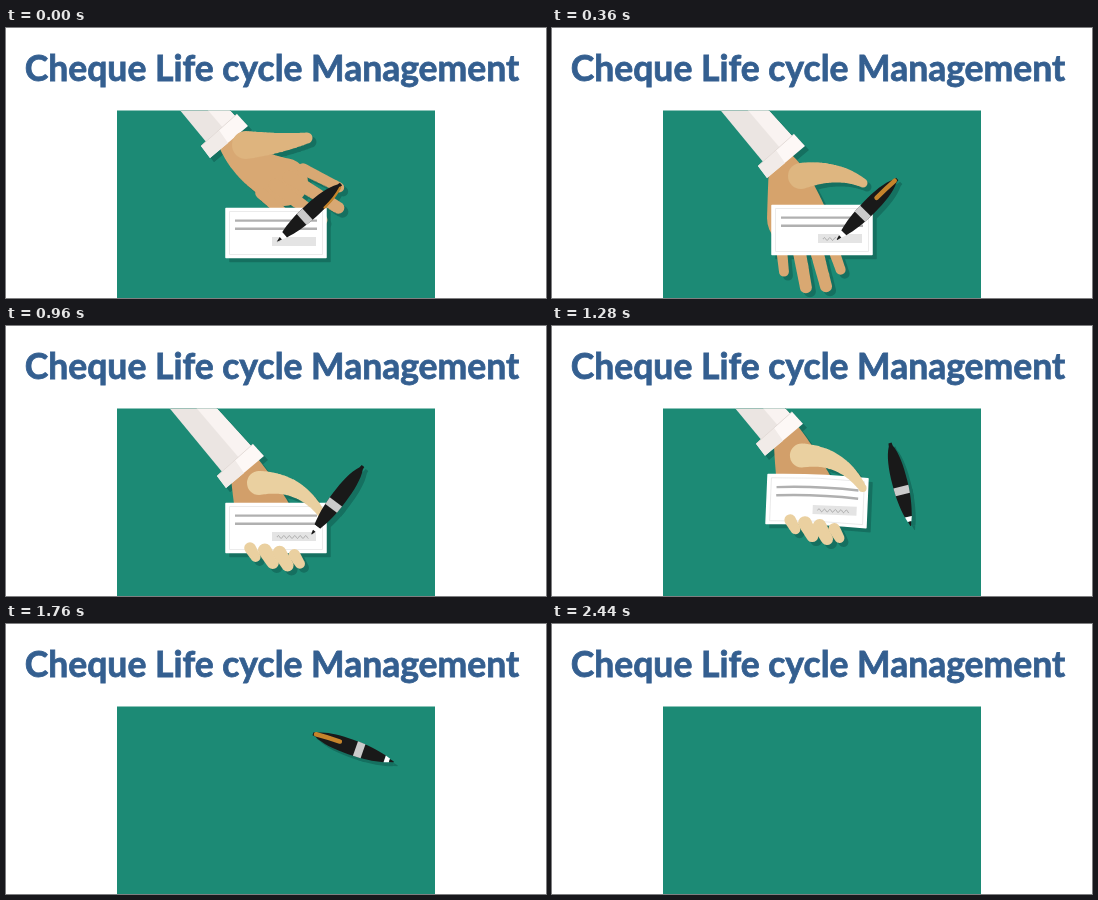
Write an HTML page with a canvas that moves like this. It is 540x270 px and loops after 2.48 s.

```html
<!DOCTYPE html>
<html lang="en">
<head>
<meta charset="utf-8">
<title>Cheque Life cycle Management</title>
<style>
  html, body { margin: 0; width: 100%; height: 100%; overflow: hidden; background: #fff; }
  svg, canvas { position: absolute; left: 0; top: 0; display: block; }
  canvas { left: 111px; top: 82px; }
  text {
    font: 700 35.5px Lato, sans-serif; text-anchor: middle;
    fill: #345f90; stroke: #345f90; stroke-width: 0.8px;
  }
</style>
</head>
<body>
<svg width="540" height="82"><text x="266" y="53">Cheque Life cycle Management</text></svg>
<canvas id="picture" width="318" height="188"></canvas>
<script>
const ctx = document.getElementById('picture').getContext('2d');
const LOOP = 2480, STEP = 40;
const GREEN = '#1c8a75', SHADE = '#157060';
let shadow = false;

// Hand poses: open, under the cheque, gripping.
// Limbs are start, bend and end points, then both radii.
const POSES = [
  { cuff: [-16, -32], palm: [227, 118, 245, 142, 278, 154, 13, 24], thumb: [240, 117, 274, 116, 301, 110, 14, 5.5],
    root: [255, 165], gap: [14, -8], aim: [42, -5, 58],
    skin: [216, 168, 115], thumbSkin: [222, 180, 126], tipSkin: [216, 168, 115] },
  { cuff: [-5, -12], palm: [231, 138, 238, 155, 245, 190, 14, 30], thumb: [249, 148, 285, 140, 311, 155, 13, 4.5],
    root: [228, 206], gap: [16, 0], aim: [84, -4.5, 54],
    skin: [214, 163, 108], thumbSkin: [222, 182, 128], tipSkin: [217, 168, 114] },
  { cuff: [0, 0], palm: [238, 138, 246, 158, 258, 190, 14, 28], thumb: [253, 157, 292, 154, 315, 187, 12, 4],
    root: [244, 222], gap: [14.8, 2.3], aim: [58, 0, 15],
    skin: [210, 159, 106], thumbSkin: [234, 208, 160], tipSkin: [234, 208, 160] }];

// time, cap x, cap y, angle
const PEN = [[0, 335, 156, 138], [960, 357, 140, 127], [1280, 338, 117, 76],
  [1600, 331, 113, 19], [2000, 240, 101, 21], [2240, 161, 63, 78], [2440, 156, -12, 88]];

const clamp = u => Math.max(0, Math.min(1, u));
const smooth = u => clamp(u) ** 2 * (3 - 2 * clamp(u));
const mix = (a, b, f) => a.map((v, i) => v + (b[i] - v) * f);

// monotone curve through key points
function along(keys, t) {
  let i = 0;
  while (i < keys.length - 2 && t >= keys[i + 1][0]) i++;
  const [a, b] = [keys[i], keys[i + 1]], span = b[0] - a[0];
  const u = clamp((t - a[0]) / span), w = 1 - u;
  const slope = (j, c) => (keys[j + 1][c] - keys[j][c]) / (keys[j + 1][0] - keys[j][0]);
  const tangent = (j, c) => {
    const p = slope(Math.max(j - 1, 0), c), q = slope(Math.min(j, keys.length - 2), c);
    return p * q <= 0 ? 0 : 2 * p * q / (p + q);
  };
  return [1, 2, 3].map(c => a[c] * (1 + 2 * u) * w * w + b[c] * u * u * (3 - 2 * u)
    + span * u * w * (w * tangent(i, c) - u * tangent(i + 1, c)));
}

function handAt(k) {
  const i = k < 1 ? 0 : 1, hand = {};
  for (const part in POSES[i]) hand[part] = mix(POSES[i][part], POSES[i + 1][part], k - i);
  return hand;
}

const rgb = c => `rgb(${c.map(Math.round)})`;
const ink = color => shadow ? SHADE : color;

function fill(color) {
  ctx.fillStyle = ink(color);
  ctx.fill();
}

function poly(color, ...pts) {
  ctx.beginPath();
  pts.forEach(p => ctx.lineTo(...p));
  ctx.closePath();
  fill(color);
}

function stroke(color, width, cap = 'butt') {
  ctx.strokeStyle = ink(color);
  ctx.lineWidth = width;
  ctx.lineCap = cap;
  ctx.stroke();
}

// tapered round shape along a quadratic curve
function limb(color, [x0, y0, cx, cy, x1, y1, r0, r1]) {
  ctx.beginPath();
  for (let i = 0; i <= 50; i++) {
    const u = i / 50, a = (1 - u) ** 2, b = 2 * u * (1 - u), c = u * u;
    const x = a * x0 + b * cx + c * x1, y = a * y0 + b * cy + c * y1, r = r0 + (r1 - r0) * u;
    ctx.moveTo(x + r, y);
    ctx.arc(x, y, r, 0, 2 * Math.PI);
  }
  fill(color);
}

function placed(x, y, deg, draw) {
  ctx.save();
  ctx.translate(x, y);
  ctx.rotate(deg * Math.PI / 180);
  draw();
  ctx.restore();
}

// pinky first; the two middle fingers are longer and thicker
function drawFingers({ root, gap, aim: [angle, spread, length], tipSkin }) {
  for (let i = 0; i < 4; i++) {
    const bulge = Math.sin(Math.PI * i / 3), a = (angle + spread * i) * Math.PI / 180;
    const len = length * (0.7 + 0.35 * bulge), r = 5 + 1.2 * bulge;
    const x = root[0] + gap[0] * i, y = root[1] + gap[1] * i;
    const dx = len * Math.cos(a), dy = len * Math.sin(a);
    limb(rgb(tipSkin), [x, y, x + dx / 2, y + dy / 2, x + dx, y + dy, r + 0.8, r]);
  }
}

function drawSleeve() {
  poly('#ebe5e2', [104, 10], [145, 10], [246, 121], [217, 147]);
  poly('#f9f3f1', [129, 10], [145, 10], [246, 121], [234, 133]);
  poly('#fdf8f6', [211, 150], [247, 118], [258, 130], [220, 162]);
  poly('#f1ebe8', [211, 150], [229, 134], [238, 147], [220, 162]);
  ctx.beginPath();
  ctx.moveTo(211, 150);
  ctx.lineTo(247, 118);
  stroke('#ddd5d1', 0.8);
}

function drawCheque(written, bend) {
  const bow = (x0, x1, y) => ctx.quadraticCurveTo((x0 + x1) / 2, y - bend, x1, y);
  const sheet = (w, h) => {
    ctx.beginPath();
    ctx.moveTo(-w, -h);
    bow(-w, w, -h);
    ctx.lineTo(w, h);
    bow(w, -w, h);
    ctx.closePath();
  };
  sheet(50, 24.5);
  ctx.lineJoin = 'round';
  fill('#fff');
  stroke('#fff', 1.5);
  if (shadow) return;
  sheet(46.5, 21.5);
  stroke('#e6e6e6', 0.8);
  for (const y of [-12.4, -4.2]) {
    ctx.beginPath();
    ctx.moveTo(-41, y);
    bow(-41, 41, y);
    stroke('#b0b0b0', 2.4);
  }
  poly('#e4e4e4', [-4, 4], [40, 4], [40, 13], [-4, 13]);
  ctx.beginPath();
  for (let x = 0; x <= written; x += 0.5) ctx.lineTo(x + 1, 9 - 1.4 * Math.sin(x * 1.15));
  stroke('#a6a6a6', 0.9, 'round');
}

function drawPen(roll) {
  ctx.beginPath();
  for (const side of [-1, 1]) {
    ctx.moveTo(0, 0);
    ctx.lineTo(0, 1.6 * side);
    ctx.lineTo(3, 2 * side);
    ctx.bezierCurveTo(12, 6.5 * side, 25, 7.7 * side, 40, 7.7 * side);
    ctx.bezierCurveTo(56, 7.7 * side, 66, 6 * side, 76, 3.5 * side);
    ctx.lineTo(76, 0);
  }
  fill('#191919');
  const band = (color, x0, r0, x1, r1) => poly(color, [x0, -r0], [x1, -r1], [x1, r1], [x0, r0]);
  band('#cbcbcb', 45, 7.7, 53, 7.3);
  band('#fff', 76, 3.5, 81, 1.9);
  band('#191919', 81, 1.6, 85.5, 0.4);
  const s = Math.sin(roll), c = Math.cos(roll);
  if (c <= 0.05 || shadow) return;
  ctx.beginPath();
  ctx.moveTo(3, 2.2 * s);
  ctx.quadraticCurveTo(14, 6.5 * s, 28, 6.8 * s);
  stroke('#c5842b', 1.5 + 3 * c, 'round');
}

function scene(t) {
  const k = t < 360 ? t / 360 : 1 + smooth((t - 600) / 300);
  const hand = handAt(k), grip = k > 1.7;
  const away = Math.max(0, t - 1120) / 400, pull = clamp(away * 2.5);
  const hx = -5 * pull, hy = -106 * away ** 1.5, turn = 20 * away - 35 * away ** 2;
  const [px, py, angle] = along(PEN, t);
  const held = draw => placed(270 + hx, 202 + hy, turn, () => {
    ctx.translate(-270, -202);
    draw();
  });

  held(() => {
    limb(rgb(hand.skin), hand.palm);
    if (!grip) drawFingers(hand);
  });
  placed(hand.cuff[0] + 1.4 * hx, hand.cuff[1] + 1.2 * hy, 0, drawSleeve);
  held(() => {
    placed(270, 202 + 3 * clamp(1 - t / 320), 0, () => drawCheque(2 + 29 * clamp(t / 960), 3 * pull));
    limb(rgb(hand.thumbSkin), hand.thumb);
    if (grip) drawFingers(hand);
  });
  placed(px, py, angle, () => drawPen((0.24 * t - 75) * Math.PI / 180));
}

function render(t) {
  ctx.clearRect(0, 0, 318, 188);
  ctx.save();
  ctx.beginPath();
  ctx.rect(0, 0.4, 318, 188);
  ctx.clip();
  ctx.fillStyle = GREEN;
  ctx.fillRect(0, 0, 318, 188);
  for (shadow of [true, false]) {
    const d = shadow ? 4 : 0;
    placed(d - 111, d - 82, 0, () => scene(t));
  }
  ctx.restore();
}

const start = performance.now();
function tick() {
  const t = (performance.now() - start) % LOOP;
  render(Math.floor(t / STEP) * STEP);
  requestAnimationFrame(tick);
}
tick();
</script>
</body>
</html>
```
